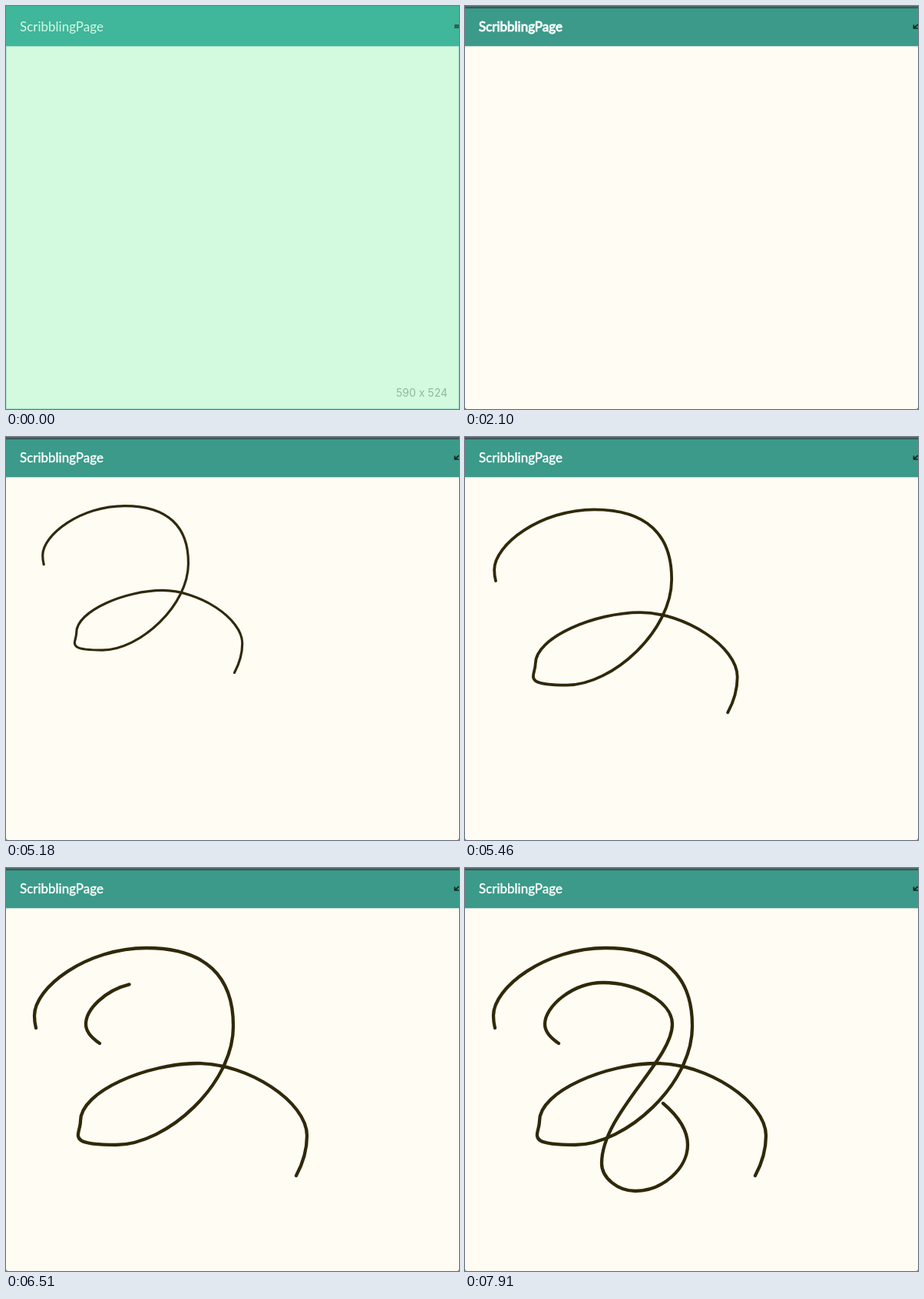
These frames come from a looping animation (590 by 524 pixels, 8000 ms). An HTML page:

```html
<!DOCTYPE html>
<html lang="en">
<head>
<meta charset="utf-8">
<title>Drawing app</title>
<style>
  html, body { margin: 0; width: 100%; height: 100%; overflow: hidden; background: #fffcf4; }
  svg { display: block; width: 590px; height: 524px; }
  .ink { fill: none; stroke: #302909; stroke-width: 4.3; stroke-linecap: round; }
  #title { font: 17px Lato, sans-serif; fill: currentColor; stroke: currentColor; }
  #size { font: 14px Inter, sans-serif; fill: #8fb8a0; }
  .hidden { visibility: hidden; }
</style>
</head>
<body>
<svg viewBox="0 0 590 524">
  <g id="app">
    <rect width="590" height="524" fill="#fffcf4"/>
    <rect width="590" height="52.3" fill="#3b9a89"/>
    <rect width="590" height="1" fill="#326f65"/>
    <path d="M0 522V524H2ZM590 522V524H588Z" fill="#8b8d8a"/>
    <path d="M584.5 24.5V29H590M585 28.5L590 24" fill="none" stroke="#10291f" stroke-width="1.7"/>
  </g>
  <g id="rim">
    <rect width="590" height="2" fill="#4d6463"/>
    <rect y="2" width="590" height="1" fill="#2c4e49"/>
  </g>
  <g id="intro">
    <rect width="590" height="524" fill="#d3f9de"/>
    <rect x=".5" y=".5" width="589" height="523" fill="none" stroke="#aee8cf"/>
    <rect width="590" height="52" fill="#40b69b"/>
    <rect y="52" width="590" height="1" fill="#9fdfc4"/>
    <rect x="584" y="24" width="6" height="5" fill="#2c6355"/>
    <text id="size" x="575" y="508" text-anchor="end">590 x 524</text>
  </g>
  <text id="title" x="18" y="33">ScribblingPage</text>
  <g id="zoom">
    <path id="first" class="ink" pathLength="1" d="M39 208Q37 200 37 192C37 155 105 104 183 104
      S296 142 296 205C297 280 210 360 143 360S97 347 97 329C97 290 185 254 250 254
      S392 304 392 348Q392 374 378 400"/>
  </g>
  <path id="second" class="ink" pathLength="1" d="M122 228Q104 216 104 203C104 180 140 149 180 149
    S270 172 270 203C270 250 178 320 178 384C178 403 199 420 222 420
    C258 420 290 390 290 360Q290 333 258 306"/>
</svg>
<script>
const LOOP = 8000, STEP = 70, LAST = 7910, FULL = 2.77;
const $ = id => document.getElementById(id);
const span = (t, a, b) => Math.min(1, Math.max(0, (t - a) / (b - a)));
const mix = (a, b, p) => a + (b - a) * p;
const bend = (a, b, c, p) => mix(mix(a, b, p), mix(b, c, p), p);
const show = (id, on) => $(id).classList.toggle('hidden', !on);

function draw(id, amount, on) {
  $(id).setAttribute('stroke-dasharray', amount + ' 2');
  show(id, on);
}

function render(t) {
  const intro = t < 70;
  show('intro', intro);
  show('app', !intro);
  show('rim', t >= 140);
  $('title').style.color = intro ? '#d3f9e6' : '#fff';
  $('title').style.strokeWidth = intro ? 0 : t < 4830 ? 0.9 : 0.4;

  // The pen slows down near the end of the first stroke
  draw('first', 0.957 * span(t, 3150, 4130) + 0.043 * span(t, 4130, 4410), t >= 3150);
  draw('second', span(t, 6230, LAST), t >= 6230);

  // Pinch zoom around the start of the stroke, which drifts on an arc
  const p = 1 - (1 - span(t, 4760, 5950)) ** 2;
  const x = bend(107, 35.5, 39, p), y = bend(160, 138.5, 208, p);
  $('zoom').setAttribute('transform',
    `translate(${x} ${y}) scale(${mix(1 / FULL, 1, p)}) translate(-39 -208)`);
}

function tick() {
  const t = performance.now() % LOOP;
  render(Math.min(LAST, Math.floor(t / STEP) * STEP));
  requestAnimationFrame(tick);
}
tick();
</script>
</body>
</html>
```
